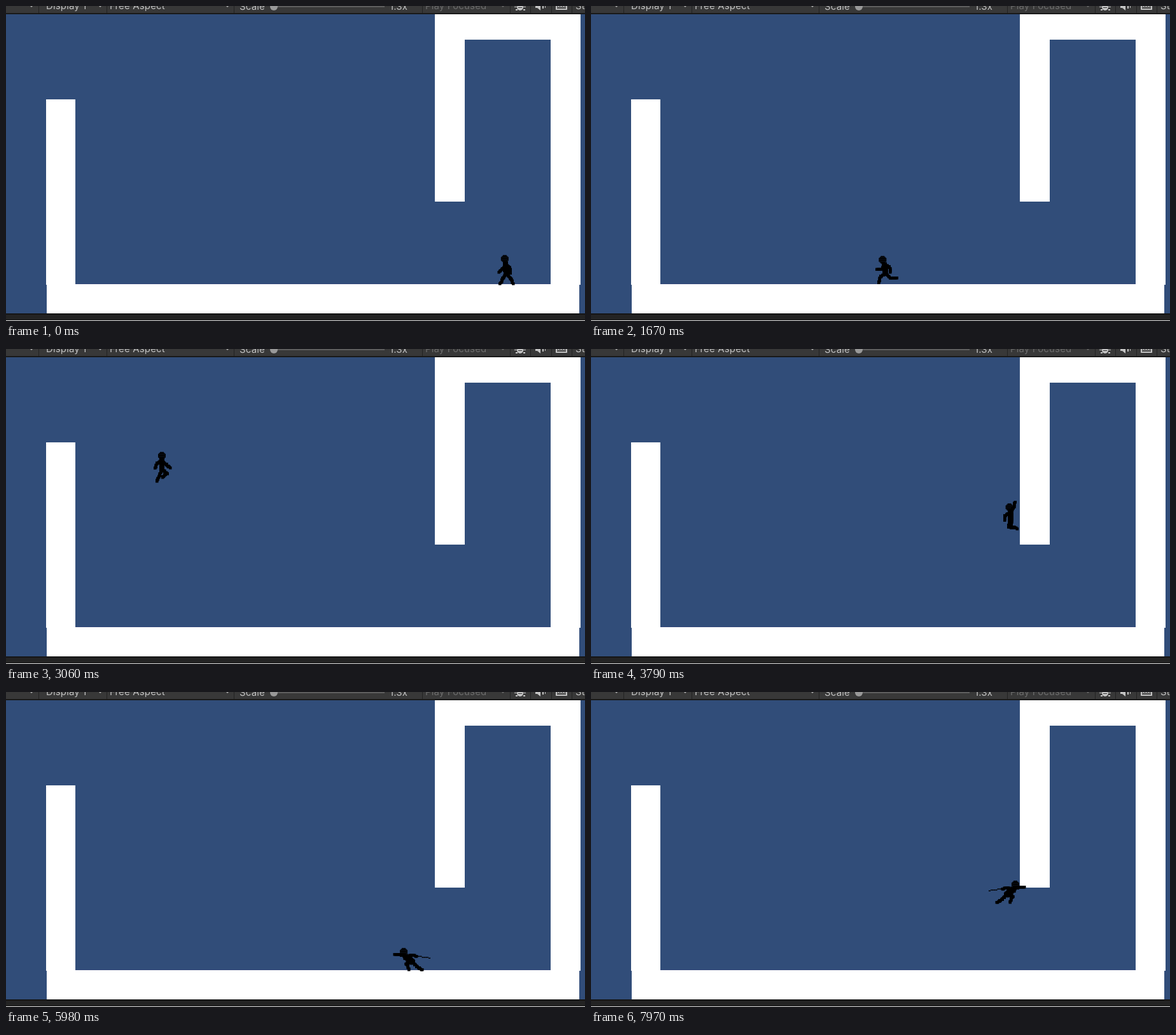
Animation, 910 px wide and 496 px high, one loop 8 s. Source, as an HTML page with a canvas:

```html
<!DOCTYPE html>
<html lang="en">
<head>
<meta charset="utf-8">
<title>Platformer run</title>
<style>
html, body { margin: 0; width: 100%; height: 100%; overflow: hidden; background: #314d79; }
canvas { display: block; }
</style>
</head>
<body>
<canvas id="stage" width="910" height="496"></canvas>
<script>
const ctx = document.getElementById('stage').getContext('2d');
const LOOP = 8000, START = 867, STEP = 66.3;

// Level limits for the hero, in pixels
const GROUND = 438, LEFT = 124, POST = 660, POST_END = 308, REACH = 36;
// Speeds in pixels per step
const RUN = 24.7, AIR = 30, DASH = 97, SLIDE = 2.47;
const JUMP = 57.2, WALL_JUMP = 59.5, HALF_G = 7.3;

function box(color, x, y, w, h) {
  ctx.fillStyle = color;
  ctx.fillRect(x, y, w, h);
}

function shape(color, ...points) {
  ctx.fillStyle = color;
  ctx.beginPath();
  for (const [x, y] of points) ctx.lineTo(x, y);
  ctx.fill();
}

function disc(color, x, y, r) {
  ctx.fillStyle = color;
  ctx.beginPath();
  ctx.arc(x, y, r, 0, Math.PI * 2);
  ctx.fill();
}

function label(text, x, y, color = '#c2c2c2') {
  ctx.fillStyle = color;
  ctx.fillText(text, x, y);
}

const chevron = (x, color = '#b0b0b0') => shape(color, [x - 3, -1], [x + 3, -1], [x, 2]);

function drawIcons(color, back) {
  disc(color, 808, 2, 5);
  for (const side of [-1, 1]) {
    box(color, 808 + side * 7 - 2, 1, 4, 1);
    box(color, 808 + side * 6 - 1, 5, 3, 2);
  }
  box(back, 805, 2, 6, 1);

  shape(color, [832, -3], [832, 3], [835, 3], [840, 7], [840, -3]);
  box(color, 843, -2, 2, 6);
  box(color, 847, -2, 1, 5);

  box(color, 864, -4, 18, 10);
  box(back, 866, -2, 14, 6);
  for (const dx of [-4, 0, 4]) box(color, 872 + dx, -2, 1, 4);
  box(color, 866, 1, 14, 1);
}

function drawToolbar() {
  box('#383838', 0, 0, 910, 11);
  box('#191919', 0, 11, 910, 2);
  for (const x of [51, 158, 358, 654, 792, 824, 857, 889]) box('#222', x, 0, 1, 11);
  ctx.font = '15px Inter, sans-serif';
  ctx.letterSpacing = '0.15px';
  label('Display 1', 63, 5);
  label('Free Aspect', 163, 5);
  label('Scale', 367, 6);
  label('1.3x', 603, 6);
  label('Play Focused', 659, 5, '#6c6c6c');
  label('St', 895, 5);
  for (const x of [40, 148, 348]) chevron(x);
  chevron(781, '#6c6c6c');
  box('#5e5e5e', 427, 0, 168, 2);
  disc('#999', 421, 1, 6);
  drawIcons('#c4c4c4', '#383838');
}

function drawLevel() {
  box('#314d79', 0, 13, 910, 471);
  box('#35497c', 109, 437, 747, 1);
  box('#fff', 63, 147, 46, 292);
  box('#fff', 64, 438, 837, 46);
  box('#fff', 674, 13, 229, 40);
  box('#fff', 674, 13, 47, 295);
  box('#fff', 856, 13, 47, 426);
  box('#151515', 0, 484, 910, 2);
  box('#232323', 0, 486, 910, 9);
  box('#ddd', 0, 495, 910, 1);
}

// Joint angles in degrees: 0 hangs down, positive points where the hero faces.
function runPose(k) {
  const swing = Math.cos(k * Math.PI / 3);
  const arm = s => [-19 + 46 * s, 42 + 53 * s];
  const leg = s => [5 + 50 * s, -37 + 53 * s];
  return { hip: [2, -17], lean: 8, nod: 20,
    arms: [arm(swing), arm(-swing)], legs: [leg(swing), leg(-swing)] };
}

const jumpPose = () => ({ hip: [1, -22], lean: 0, nod: 0,
  arms: [[50, 48], [-62, -18]], legs: [[55, -50], [-22, -25]] });

const POSES = {
  run: runPose,
  jump: jumpPose,
  fall: jumpPose,
  stand: () => ({ hip: [0, -18], lean: 3, nod: 10,
    arms: [[28, 55], [-45, -10]], legs: [[28, 28], [-38, -30]] }),
  cling: () => ({ hip: [0, -13], lean: -4, nod: -10,
    arms: [[145, 165], [-60, -10]], legs: [[-25, 92], [0, 80]] }),
  dash: () => ({ hip: [-2, -13], lean: 53, nod: 20, sword: true,
    arms: [[110, 95], [-100, -85]], legs: [[75, -25], [-40, -58]] })
};

const CELL = 1.5;
const snap = v => Math.round(v / CELL) * CELL;

function polar([x, y], angle, length) {
  const a = angle * Math.PI / 180;
  return [x + Math.sin(a) * length, y + Math.cos(a) * length];
}

// Stamps square cells so that the figure keeps stepped edges.
function bone([x1, y1], [x2, y2], w) {
  const n = Math.ceil(Math.hypot(x2 - x1, y2 - y1) / CELL);
  for (let i = 0; i <= n; i++) {
    const x = x1 + (x2 - x1) * i / n, y = y1 + (y2 - y1) * i / n;
    ctx.fillRect(snap(x - w / 2), snap(y - w / 2), w, w);
  }
}

function limb(root, [upper, lower], a, b) {
  const joint = polar(root, upper, a), end = polar(joint, lower, b);
  bone(root, joint, 4.5);
  bone(joint, end, 4.5);
  return end;
}

function drawHead([x, y], r) {
  for (let dy = -r; dy < r; dy += CELL) {
    const half = snap(Math.sqrt(Math.max(0, r * r - (dy + CELL / 2) ** 2)));
    ctx.fillRect(x - half, y + dy, half * 2, CELL + 0.1);
  }
}

function drawHero({ x, y, mode, face }, k) {
  const pose = POSES[mode](k);
  const shoulder = polar(pose.hip, 180 - pose.lean, 14);
  ctx.save();
  ctx.translate(Math.round(x), Math.round(y));
  ctx.scale(face, 1);
  ctx.fillStyle = '#000';
  bone(pose.hip, shoulder, 8);
  drawHead(polar(shoulder, 180 - pose.nod, 8), 6);
  const hands = pose.arms.map(a => limb(shoulder, a, 9, 8));
  pose.legs.forEach(a => limb(pose.hip, a, 10, 10));
  if (pose.sword) bone(hands[1], [-30, -19], 1.5);
  ctx.restore();
}

const ACTIONS = {
  run: (h, dir) => Object.assign(h, { mode: 'run', face: dir, vx: dir * RUN }),
  stand: (h, dir) => Object.assign(h, { mode: 'stand', face: dir, vx: 0 }),
  dash: (h, dir) => Object.assign(h, { mode: 'dash', face: dir, vx: dir * DASH, vy: 0 }),
  drop: h => Object.assign(h, { mode: 'fall', vx: RUN }),
  jump(h) {
    if (h.mode === 'cling') {
      h.face = -h.face;
      h.vx = h.face * AIR;
      h.vy = -WALL_JUMP;
    } else {
      h.vy = -JUMP;
    }
    h.mode = 'jump';
  }
};

// Player input by step
const INPUT = {
  0: ['run', -1], 23: ['jump'], 30: ['jump'], 37: ['dash', 1], 65: ['drop'],
  70: ['stand', -1], 76: ['run', -1], 77: ['dash', -1], 81: ['run', -1],
  87: ['jump'], 97: ['jump'], 105: ['dash', 1]
};

function wallSide(h, oldX) {
  if (h.x < LEFT) return -1;
  return oldX <= POST && h.x > POST && h.y - REACH < POST_END ? 1 : 0;
}

function advance(h) {
  const oldX = h.x;
  h.x += h.vx;
  if (h.mode === 'cling') h.y += SLIDE;
  if (h.mode === 'jump' || h.mode === 'fall') {
    h.y += h.vy + HALF_G;
    h.vy += 2 * HALF_G;
    if (h.y >= GROUND) Object.assign(h, { y: GROUND, vy: 0, mode: 'run' });
  }
  const side = wallSide(h, oldX);
  if (!side) return;
  h.x = side < 0 ? LEFT : POST;
  const grabs = h.mode === 'jump' || h.mode === 'dash';
  if (grabs && h.vy >= 0) Object.assign(h, { mode: 'cling', face: side, vx: 0, vy: SLIDE });
}

function simulate(count) {
  const hero = { x: 786, y: GROUND, vx: 0, vy: 0, mode: 'stand', face: -1 };
  const states = [{ ...hero }];
  for (let k = 0; k < count; k++) {
    const [name, dir] = INPUT[k] || [];
    if (name) ACTIONS[name](hero, dir);
    advance(hero);
    states.push({ ...hero });
  }
  return states;
}

const states = simulate(Math.ceil((LOOP - START) / STEP));
const origin = performance.now();

function frame() {
  const t = (performance.now() - origin) % LOOP;
  const k = Math.max(-1, Math.floor((t - START) / STEP));
  drawLevel();
  drawToolbar();
  drawHero(states[k + 1], k);
  requestAnimationFrame(frame);
}
frame();
</script>
</body>
</html>
```
